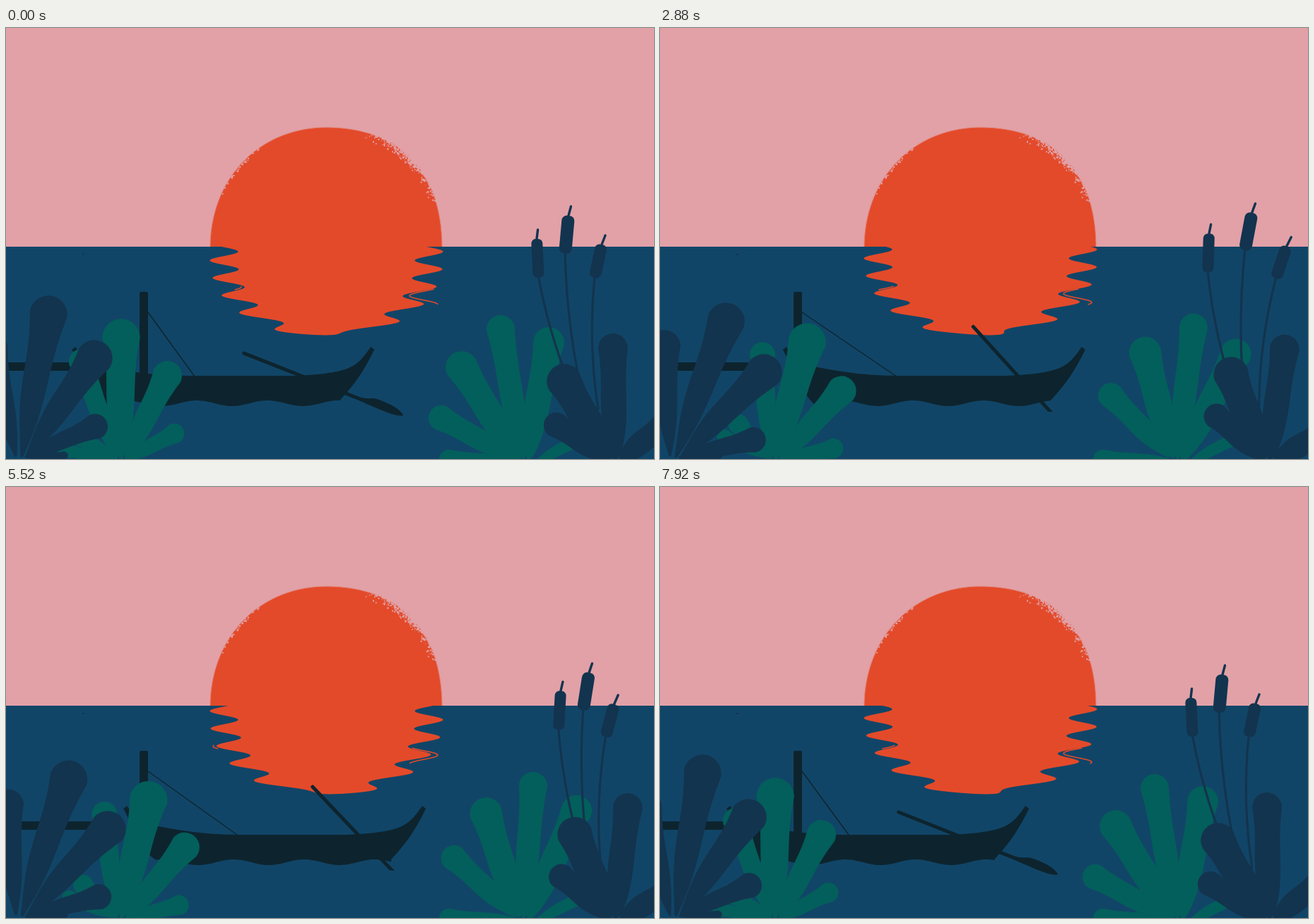
These frames come from a looping animation (917x611 px, 8 s). An HTML page with a canvas:

```html
<!DOCTYPE html>
<html lang="en">
<head>
<meta charset="utf-8">
<title>Sunset lake</title>
<style>
  html, body { margin: 0; width: 100%; height: 100%; overflow: hidden; background: #114567; }
  canvas { display: block; width: 917px; height: 611px; }
</style>
</head>
<body>
<canvas id="stage" width="917" height="611"></canvas>
<script>
const ctx = document.getElementById('stage').getContext('2d');
const W = 917, H = 611, HORIZON = 310;
const LOOP = 8000, STEP = 80, TAU = Math.PI * 2, DEG = Math.PI / 180;
const SKY = '#e1a1a7', SEA = '#114567', SUN = '#e34a2a';
const DARK = '#0d242e', NAVY = '#13344e', GREEN = '#035f5b';

// A plant turns about its foot by `turn` degrees; `taper` thins the stalks.
// Leaves: head centre and radius.
const leftPlants = [
  { x: 162, y: 612, turn: 18, taper: 0.7, color: GREEN,
    leaves: [[85, 599, 11], [100, 577, 15], [107, 473, 19], [238, 575, 15], [228, 493, 22], [163, 439, 28]] },
  { x: 17, y: 608, turn: 11.5, taper: 0.9, color: NAVY,
    leaves: [[-20, 455, 24], [60, 406, 28], [125, 468, 27], [126, 565, 19]] },
  { x: 20, y: 608, turn: 0, taper: 0.6, color: NAVY, leaves: [[82, 606, 6]] }
];
const rightPlants = [
  { x: 740, y: 616, turn: 0, taper: 0.6, color: GREEN, leaves: [[627, 612, 15], [818, 580, 11]] },
  { x: 735, y: 612, turn: 20.5, taper: 0.5, color: GREEN,
    leaves: [[616, 553, 19], [645, 481, 24], [700, 427, 21], [768, 446, 23]] }
];
const frontPlant = { x: 862, y: 612, turn: 11, taper: 0.42, color: NAVY,
  leaves: [[859, 454, 22], [790, 501, 26], [779, 563, 19], [932, 562, 20]] };

// Reeds: head top, reach and rise of the sway, lean, head size, foot
const reeds = [
  { x: 751, y: 299, reach: 45, rise: 13, lean: -0.05, len: 55, w: 16, foot: 812, lag: 350, gain: 1.17 },
  { x: 796, y: 266, reach: 61, rise: 6, lean: 0.09, len: 54, w: 18, foot: 820, lag: 0, gain: 1.02 },
  { x: 843, y: 307, reach: 54, rise: -3, lean: 0.21, len: 48, w: 17, foot: 838, lag: -300, gain: 1 }
];

const swing = t => (1 - Math.cos(TAU * t / LOOP)) / 2;

function fill(color) {
  ctx.fillStyle = color;
  ctx.fill();
}

function stroke(width, color) {
  ctx.lineWidth = width;
  ctx.strokeStyle = color;
  ctx.stroke();
}

// Slightly squared dome, fuller on the right
function sunPoint(a, k = 1) {
  const bulge = (Math.cos(a) > 0 ? 0.043 : 0.012) * Math.sin(2 * a) ** 2;
  const r = k * (1 + bulge);
  return [453 + 164 * r * Math.cos(a), 311 - 170 * r * Math.sin(a)];
}

const sunRim = new Path2D();
for (let d = 180; d >= 0; d--) sunRim.lineTo(...sunPoint(d * DEG));

const specks = new Path2D();
let seed = 11;
const rnd = () => (seed = (seed * 16807) % 2147483647) / 2147483647;
function grain(count, from, to, depth) {
  for (let i = 0; i < count; i++) {
    const a = from + (to - from) * (rnd() + rnd()) / 2;
    const size = 0.6 + 1.8 * rnd();
    specks.rect(...sunPoint(a * DEG, 1.003 - depth * rnd() * rnd()), size, size);
  }
}
grain(380, 22, 70, 0.075);
grain(40, 122, 156, 0.02);

function drawSun() {
  ctx.fillStyle = SUN;
  ctx.fill(sunRim);
  ctx.strokeStyle = '#e37d70';
  ctx.lineWidth = 1;
  ctx.stroke(sunRim);
  ctx.fillStyle = SKY;
  ctx.fill(specks);
}

function drawReflection(t) {
  const bottom = 435.5;
  const shift = y => -20 * Math.cos(TAU * ((y - 329.5) / 25 - t / 1000));
  const half = y => 145 * Math.sqrt(1 - (Math.max(0, y - 330) / (bottom - 330)) ** 2);
  ctx.beginPath();
  for (let y = HORIZON; y <= bottom; y += 0.5) ctx.lineTo(453.5 - half(y) + shift(y), y);
  for (let y = bottom; y >= HORIZON; y -= 0.5) ctx.lineTo(453.5 + half(y) + shift(y), y);
  fill(SUN);

  const ripple = (x, from, to) => {
    ctx.beginPath();
    for (let y = from; y <= to; y += 0.5) ctx.lineTo(x + shift(y), y);
    stroke(1.5, SUN);
  };
  ripple(591, 370, 392);
  ripple(313, 366, 371);
}

function drawDock(boatX) {
  ctx.fillStyle = DARK;
  ctx.fillRect(0, 474, 125, 12);
  ctx.beginPath();
  ctx.roundRect(189, 374, 12, 118, 2);
  ctx.fill();
  ctx.beginPath();
  ctx.moveTo(201, 403);
  ctx.lineTo(279 + boatX, 511);
  stroke(1.4, DARK);
}

function drawOar(t) {
  const deg = 21.5 + 36 * swing(t - 150) ** 1.2;
  const cut = 45 + 528 / (deg - 17);
  ctx.save();
  ctx.translate(430, 498);
  ctx.rotate(deg * DEG);
  // waterline across the blade
  ctx.beginPath();
  ctx.moveTo(-200, -40);
  ctx.lineTo(cut + 40, -40);
  ctx.lineTo(cut - 40, 40);
  ctx.lineTo(-200, 40);
  ctx.clip();
  ctx.beginPath();
  ctx.roundRect(-103, -2.5, 190, 5, 2);
  fill(DARK);
  ctx.beginPath();
  ctx.moveTo(76, -2.5);
  ctx.bezierCurveTo(90, -4, 90, -9, 103, -9);
  ctx.bezierCurveTo(122, -9, 132, -8, 142, -1);
  ctx.bezierCurveTo(134, 5, 112, 4, 76, 2.5);
  fill(DARK);
  ctx.restore();
}

function drawBoat(t, boatX) {
  ctx.save();
  ctx.translate(boatX, 0);
  drawOar(t);
  ctx.beginPath();
  ctx.moveTo(93, 456);
  ctx.lineTo(98, 452);
  ctx.bezierCurveTo(112, 474, 126, 478, 148, 482);
  ctx.bezierCurveTo(190, 490, 220, 493, 265, 493);
  ctx.lineTo(410, 493);
  ctx.bezierCurveTo(490, 489, 496, 480, 516, 452);
  ctx.lineTo(521, 456);
  ctx.bezierCurveTo(506, 486, 496, 502, 472, 528);
  for (let x = 472; x >= 138; x -= 3) {
    ctx.lineTo(x, 532 - 4 * Math.cos(TAU * ((x + boatX - 270) / 100 - t / 1000)));
  }
  ctx.bezierCurveTo(118, 515, 112, 492, 93, 456);
  fill(DARK);
  ctx.restore();
}

// Club-shaped leaf along +x with a wavy outline and a round head
function drawLeaf(len, r, taper) {
  const width = (u, side) =>
    r * (0.1 + 0.9 * u ** taper + 0.1 * Math.sin(TAU * u - 0.5 + 0.4 * side * (1 - u)));
  const N = 28, cap = width(1, 0);
  ctx.beginPath();
  for (let i = 0; i <= N; i++) ctx.lineTo(len * i / N, -width(i / N, -1));
  ctx.arc(len, 0, cap, -Math.PI / 2, Math.PI / 2);
  for (let i = N; i >= 0; i--) ctx.lineTo(len * i / N, width(i / N, 1));
  ctx.fill();
}

function drawPlant({ x, y, turn, taper, color, leaves }, e) {
  ctx.save();
  ctx.translate(x, y);
  ctx.rotate(turn * e * DEG);
  ctx.fillStyle = color;
  for (const [hx, hy, r] of leaves) {
    const dx = hx - x, dy = hy - y, root = dx * 0.1;
    ctx.save();
    ctx.translate(root, 0);
    ctx.rotate(Math.atan2(dy, dx - root));
    drawLeaf(Math.hypot(dx - root, dy), r, taper);
    ctx.restore();
  }
  ctx.restore();
}

function drawReed(reed, t) {
  const e = reed.gain * swing(t - reed.lag) ** 2;
  const x = reed.x + reed.reach * e, y = reed.y - reed.rise * e;
  const lean = reed.lean + 0.14 * e;
  const r = reed.w / 2, foot = reed.foot + 12 * e;
  const endX = x - reed.len * Math.sin(lean), endY = y + reed.len * Math.cos(lean);

  ctx.lineCap = 'round';
  ctx.beginPath();
  ctx.moveTo(endX, endY);
  ctx.quadraticCurveTo((endX + foot) / 2 - 12, (endY + 540) / 2, foot, 540);
  stroke(3.2, NAVY);

  ctx.beginPath();
  ctx.moveTo(x, y);
  ctx.lineTo(x + 14 * Math.sin(lean + 0.16), y - 13);
  stroke(3.4, NAVY);
  ctx.lineCap = 'butt';

  ctx.save();
  ctx.translate(x, y);
  ctx.rotate(lean);
  ctx.beginPath();
  ctx.roundRect(-r, 0, reed.w, reed.len, r * 0.8);
  fill(NAVY);
  ctx.restore();
}

function draw(t) {
  const sway = swing(t), leftSway = sway ** 0.88;
  const boatX = 95 * swing(t - 50) ** 0.74;
  ctx.fillStyle = SKY;
  ctx.fillRect(0, 0, W, H);
  drawSun();
  ctx.fillStyle = SEA;
  ctx.fillRect(0, HORIZON, W, H - HORIZON);
  ctx.fillStyle = NAVY;
  ctx.fillRect(108, 320, 3, 2);
  drawReflection(t);
  drawDock(boatX);
  drawBoat(t, boatX);
  leftPlants.forEach(plant => drawPlant(plant, leftSway));
  rightPlants.forEach(plant => drawPlant(plant, sway));
  reeds.forEach(reed => drawReed(reed, t));
  drawPlant(frontPlant, sway);
}

const start = performance.now();
function tick() {
  const t = Math.max(0, performance.now() - start) % LOOP;
  draw(Math.floor(t / STEP) * STEP);
  requestAnimationFrame(tick);
}
tick();
</script>
</body>
</html>
```
